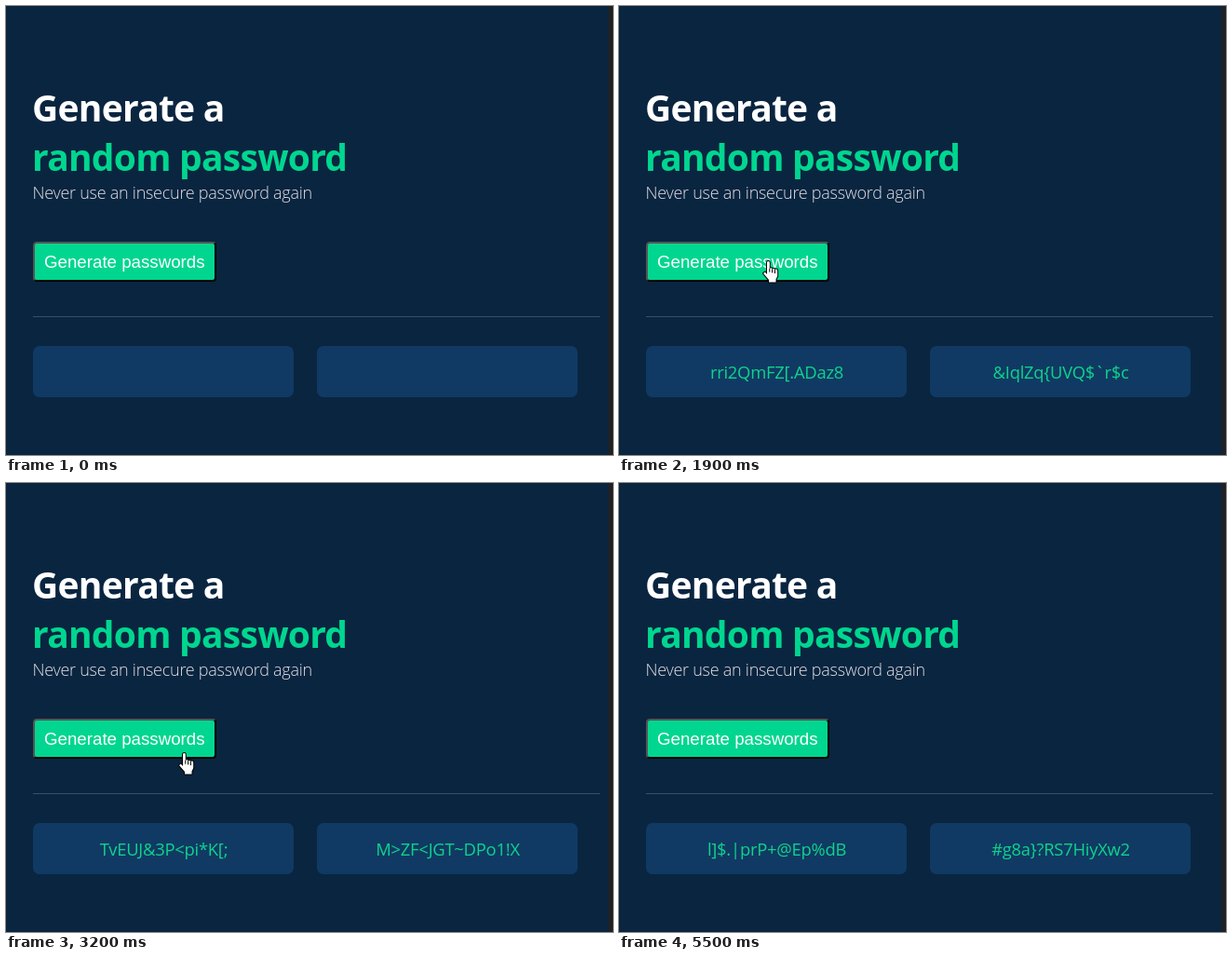
These frames come from a looping animation (652x482 px, 5600 ms). An HTML page with a canvas:

```html
<!DOCTYPE html>
<html lang="en">
<head>
<meta charset="utf-8">
<title>Random password generator</title>
<style>
  html, body { margin: 0; width: 100%; height: 100%; overflow: hidden; background: #0a2540; }
  canvas { display: block; width: 652px; height: 482px; }
</style>
</head>
<body>
<canvas id="stage" width="652" height="482"></canvas>
<script>
const ctx = document.getElementById('stage').getContext('2d');
const LOOP = 5600, STEP = 100;
const GREEN = '#00d68f', SHADE = '#555';
const SANS = '"Open Sans", "Noto Sans", sans-serif';

// Each click is held for one step; its release shows the next pair
const clicks = [1000, 2100, 3400];
const pairs = [
  ['', ''],
  ['rri2QmFZ[.ADaz8', '&IqlZq{UVQ$`r$c'],
  ['TvEUJ&3P<pi*K[;', 'M>ZF<JGT~DPo1!X'],
  ['l]$.|prP+@Ep%dB', '#g8a}?RS7HiyXw2']
];

// Stops of the pointer, eased in between
const stops = [
  { t: 700, x: 25, y: 300 },
  { t: 1000, x: 114, y: 264 },
  { t: 1900, x: 154, y: 273 },
  { t: 2700, x: 362, y: 251 },
  { t: 2900, x: 376, y: 380 },
  { t: 3300, x: 150, y: 272 },
  { t: 3600, x: 182, y: 266 },
  { t: 4400, x: 187, y: 254 },
  { t: 4700, x: 196, y: 145 }
];

const arrow = new Path2D('M.5 .5V17L4.4 13.4L6.8 19L9.3 18L6.9 12.4H12Z');
const hand = makeHand();

function makeHand() {
  const path = new Path2D('M5 13H16.2V17L14.5 20.5V23.5H7V21L1 14L2.8 12.5L5 15Z');
  for (let i = 0; i < 4; i++) {
    const top = i ? 7.5 + i * 0.7 : 1;
    path.roundRect(5 + i * 2.8, top, 2.8, 18 - top, 1.4);
  }
  return path;
}

function box(x, y, w, h, r, color) {
  ctx.fillStyle = color;
  ctx.beginPath();
  ctx.roundRect(x, y, w, h, r);
  ctx.fill();
}

function text(str, x, y, font, color, spacing = 0, align = 'left') {
  ctx.font = font;
  ctx.letterSpacing = spacing + 'px';
  ctx.fillStyle = color;
  ctx.textAlign = align;
  ctx.fillText(str, x, y);
}

function button(pressed) {
  const x = 29, y = 253, w = 197, h = 43;
  ctx.save();
  ctx.beginPath();
  ctx.roundRect(x, y, w, h, 4);
  ctx.clip();
  ctx.fillStyle = pressed ? SHADE : '#000';
  ctx.fillRect(x, y, w, h);
  ctx.fillStyle = pressed ? '#000' : SHADE;
  ctx.beginPath();
  ctx.moveTo(x, y);
  ctx.lineTo(x + w, y);
  ctx.lineTo(x + w - 2, y + 2);
  ctx.lineTo(x + 2, y + h - 2);
  ctx.lineTo(x, y + h);
  ctx.fill();
  ctx.restore();
  box(x + 2, y + 2, w - 4, h - 4, 2, GREEN);
  text('Generate passwords', 41, 281, '18.72px "Liberation Sans", Arial, sans-serif', '#fff');
}

function pointerAt(t) {
  const next = stops.findIndex(s => s.t > t);
  if (next < 1) return null;
  const a = stops[next - 1], b = stops[next];
  const u = (t - a.t) / (b.t - a.t);
  const k = u * u * (3 - 2 * u);
  return { x: Math.round(a.x + (b.x - a.x) * k), y: Math.round(a.y + (b.y - a.y) * k) };
}

function pointer(t) {
  const p = pointerAt(t);
  if (!p) return;
  const overButton = p.x > 26 && p.x < 219 && p.y > 251 && p.y < 295;
  const shape = overButton ? hand : arrow;
  ctx.save();
  ctx.translate(p.x, p.y);
  ctx.strokeStyle = '#000';
  ctx.lineWidth = 2;
  ctx.lineJoin = 'round';
  ctx.stroke(shape);
  ctx.fillStyle = '#fff';
  ctx.fill(shape);
  if (overButton) {
    ctx.fillStyle = '#000';
    for (let i = 1; i < 4; i++) ctx.fillRect(4.5 + i * 2.8, 8 + i * 0.7, 1, 4);
  }
  ctx.restore();
}

function draw(t) {
  ctx.fillStyle = '#0a2540';
  ctx.fillRect(0, 0, 652, 482);
  ctx.fillStyle = '#202124';
  ctx.fillRect(647, 0, 5, 482);

  const title = `bold 39px ${SANS}`;
  text('Generate a', 28, 123.5, title, '#fff', -0.75);
  text('random password', 28, 176.5, title, GREEN, -0.75);
  text('Never use an insecure password again', 28.5, 207, `300 18px ${SANS}`, '#e2e2e6', -0.26);
  button(clicks.some(c => t >= c && t < c + STEP));

  ctx.fillStyle = '#365064';
  ctx.fillRect(29, 333, 609, 1);

  const shown = clicks.filter(c => t >= c + STEP).length;
  pairs[shown].forEach((word, i) => {
    const x = 29 + i * 305;
    box(x, 365, 280, 55, 7, '#103a63');
    text(word, x + 140.5, 400, `18.4px ${SANS}`, '#0fd38d', -0.25, 'center');
  });
  pointer(t);
}

const start = performance.now();
function tick() {
  const t = (performance.now() - start) % LOOP;
  draw(Math.floor(t / STEP) * STEP);
  requestAnimationFrame(tick);
}
tick();
</script>
</body>
</html>
```
